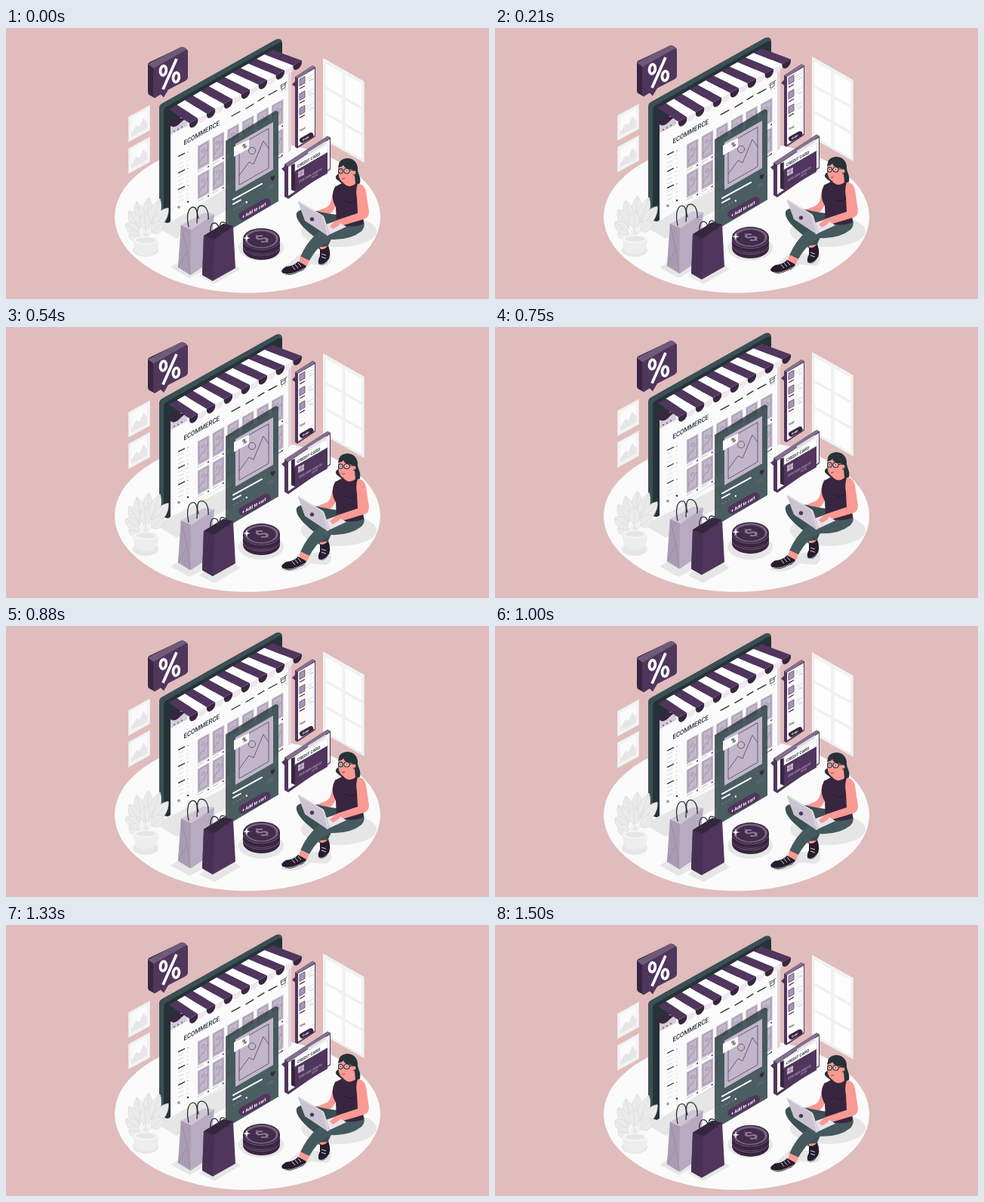
These frames come from a looping animation (640 px wide and 360 px high, 1.54 s). An HTML page:

```html
<!DOCTYPE html>
<html lang="en">
<head>
<meta charset="utf-8">
<style>
html,body{margin:0;width:100%;height:100%;overflow:hidden;background:#e0bcbc}
svg{display:block;width:100vw;height:100vh}
text{font-family:Roboto,sans-serif}
.p{fill:#50355d}.d{fill:#38253f}.l{fill:#c2b7ca}.w{fill:#fafafa}
.skin{fill:#f99a93}.hair{fill:#263238}.shoe{fill:#271b2d}.sh{fill:#e6e6e6}
.line{fill:none;stroke:#263238;stroke-width:1.3;stroke-linecap:round;stroke-linejoin:round}
</style>
</head>
<body>
<svg viewBox="0 0 640 360">
<rect width="640" height="360" fill="#e0bcbc"/>
<ellipse cx="320" cy="251" rx="176" ry="101" class="w"/>
<g class="sh">
  <path d="M198 263L226 280L310 232V205Z"/>
  <path d="M218 318L243 332L270 318L256 330L276 340L311 320L290 305L240 305Z"/>
  <ellipse cx="185" cy="295" rx="17" ry="9"/>
  <ellipse cx="338" cy="292" rx="30" ry="17"/>
  <ellipse cx="441" cy="270" rx="50" ry="21"/>
  <path d="M364 322Q384 331 404 314L424 316Q434 312 430 300L390 300Z"/>
</g>

<g id="float">
  <g id="wall"></g>

  <!-- monitor -->
  <path d="M203 106Q203 102 207 100L358 15Q365 13 366 19V170L215 259L203 257Z" fill="#3a4f54"/>
  <path d="M209 111Q209 107 212 105L361 20Q366 18 366 22V170L214 259L209 257Z" class="hair"/>
  <path d="M218 127L374 40L378 58V162L218 258Z" class="w"/>
  <path d="M374 54L378 56V162L374 165Z" fill="#e4d6dc"/>
  <path d="M218 128L240 116V130L218 142Z" fill="#d5cbda"/>
  <path d="M217 120L238 120L231 126Q224 134 218 130Z" class="d"/>
  <g fill="#75657f"><circle cx="223" cy="137" r="1.1"/><circle cx="228" cy="134.500" r="1.1"/><circle cx="233" cy="131.500" r="1.1"/></g>
  <text transform="matrix(.87 -.5 0 1 235.500 156)" font-size="9" font-weight="500" fill="#263238"><tspan fill="#50355d" font-weight="700">E</tspan>COMMERCE</text>
  <path class="line" d="M299 117l11-6M318 107l10-6M334 97l8-5M348 89l11-6"/>
  <path class="line" style="stroke-width:.8" d="M372 71l-2 2v6l-5 3l-1-6l6-3M365 78l5-3M366 84v.2M370 82v.2"/>
  <g id="shop"></g>
  <g id="awning"></g>

  <!-- percent bubble -->
  <g transform="translate(0 1)">
    <path d="M188 48Q188 45 191 44L231 25Q234 23 238 26L241 29L213 80L209 91L205 87L197 92L190 88Q188 87 188 84Z" class="d"/>
    <path d="M188 47L230 25Q234 23 238 26L240 28L196 53Z" fill="#705a7a"/>
    <path d="M195 55Q195 53 198 51L237 29Q241 27 241 31V65Q241 67 238 69L215 81L209 91L206 86L198 91Q195 92 195 89Z" class="p"/>
    <g fill="none" stroke="#fff" stroke-width="3.700">
      <ellipse cx="208.500" cy="55.500" rx="3.900" ry="6.300" transform="rotate(8 208 55)"/>
      <ellipse cx="225.500" cy="64.500" rx="3.900" ry="6.300" transform="rotate(8 225 64)"/>
      <path d="M208 80.500L226 40"/>
    </g>
  </g>

  <!-- basket panel -->
  <path d="M383 65L406 50L410 52V144L386 160L383 158V78L379 75L383 71Z" class="p"/>
  <path d="M383 65L406 50L410 52L387 67Z" fill="#83708c"/>
  <path d="M387 67L409 54V143L387 157Z" class="w"/>
  <g id="basket"></g>

  <!-- card panel -->
  <path d="M369 181L426 143.500L430 145.500V188L374 227L369 224V191L365 187L369 184Z" class="p"/>
  <path d="M369 181L426 143.500L430 145.500L374 184Z" fill="#83708c"/>
  <path d="M374 184.500L429 147.500V187L374 223Z" class="w"/>
  <path d="M378 182L383 180V217L378 215Z" class="d"/>
  <path d="M383 180L426 155V167L383 192Z" fill="#fff" stroke="#ddd5e0" stroke-width=".6"/>
  <path d="M383 190L426 165V193L383 218Z" class="p"/>
  <path d="M400 165L424 150V154L400 169Z" fill="#e3dde5"/>
  <text transform="matrix(.87 -.5 0 1 386 186)" font-size="5.600" font-weight="700" fill="#263238">CREDIT CARD</text>
  <path d="M387 191L395 187V195L387 199Z" class="l"/>
  <path d="M387 195l8-4M391 189v8" stroke="#735f7d" stroke-width=".6"/>
  <g fill="#d5c9da">
    <text transform="matrix(.87 -.5 0 1 388 206)" font-size="4.100">0000 0000 0000 00</text>
    <text transform="matrix(.87 -.5 0 1 405 200)" font-size="3.500">00/00</text>
  </g>

  <!-- product panel -->
  <path d="M291 150L357 110L361 111V230L295 269L291 267Z" fill="#263238" opacity=".78"/>
  <path d="M295 152L361 113V230L295 269Z" fill="#475c61" opacity=".75"/>
  <path d="M304 154L354 125V188L304 217Z" fill="#c2b7ca"/>
  <g fill="none" stroke="#624d6d" stroke-width=".9">
    <path d="M309 156L348 133.500V186L309 208.500Z"/>
    <circle cx="326" cy="163" r="4.600"/>
    <path d="M309 196L322 178L328 181L341 150L348 160"/>
  </g>
  <path d="M302 158L322 148V160L302 171Z" class="w"/>
  <text transform="matrix(.87 -.5 0 1 313 162)" font-size="9.500" font-weight="700" fill="#263238">%</text>
  <path d="M301 228L339 207M301 234L311 228.500" stroke="#fff" stroke-width="2" stroke-linecap="round"/>
  <g id="rating"></g>
  <path d="M353.500 203q-4-2-2.500-5q2-2 2.500 0q2-4 3-1q0 3-3 6" class="d"/>
  <text transform="matrix(.87 -.5 0 1 347 215)" font-size="5.500" fill="#806c8a">$$$</text>
  <path d="M314 249.500L345 232" stroke="#50355d" stroke-width="11.500" stroke-linecap="round"/>
  <text transform="matrix(.87 -.5 0 1 313 253.500)" font-size="6.300" font-weight="700" fill="#fff">+ Add to cart</text>

  <g id="plant"></g>

  <!-- bags -->
  <path d="M232 262L262 246L276 247L270 311L245 328L228 318Z" fill="#b8abc1"/>
  <path d="M232 262L245 268L244 328L228 318Z" fill="#a99cb2"/>
  <path d="M232 262L240 296L228 318M240 296L244 327" fill="none" stroke="#8e8098" stroke-width=".6"/>
  <path d="M232 262L262 246L276 247L246 268Z" fill="#cfc5d5"/>
  <path class="line" d="M242 264C238 246 243 238 248 238S254 246 253 259M255 253C252 243 254 236 259 236S269 242 268 254"/>
  <path d="M262 276L288 260L301 263L304 319L274 336L260 328Z" class="p"/>
  <path d="M262 276L276 281L274 336L260 328Z" fill="#482f54"/>
  <path d="M262 276L288 260L301 263L276 281Z" fill="#39243f"/>
  <path class="line" d="M272 282C269 266 272 259 276 259S284 264 282 277M284 270C282 262 284 257 288 258S295 262 294 270"/>

  <g id="coins"></g>

  <!-- woman -->
  <path d="M441 182C441 171 463 168 466 185C465 193 471 197 469 206Q463 214 448 209L438 201Q435 197 440 194Z" class="hair"/>
  <path d="M437 209C430 220 434 232 425 238L410 244L411 249L431 246C439 237 441 226 444 217Z" class="skin"/>
  <path d="M438 248C416 245 389 236 385 246C383 256 397 269 416 283L414 294L426 291L432 278L440 263Z" fill="#3c4f54"/>
  <path d="M437 254L472 253Q478 262 471 270Q456 282 431 281Q415 286 402 309L390 304Q398 285 413 272Q425 262 437 260Z" fill="#455a5f"/>
  <path d="M436 211L447 205L461 206L473 211Q478 227 472 240L474 260Q458 267 438 260L437 238Q429 224 436 211Z" class="d"/>
  <path d="M448 229q9 6 16 0M470 218q1 11-2 18" fill="none" stroke="#251629" stroke-width=".8"/>
  <path d="M450 196L462 196L463 207Q455 214 447 206Z" class="skin"/>
  <path d="M442 181Q450 176 460 183L462 196Q456 208 446 205Q439 200 441 188Z" class="skin"/>
  <path d="M440 185Q442 175 452 174Q463 174 464 188L461 197Q459 193 459 188Q449 188 447 182Q445 185 440 185Z" class="hair"/>
  <circle cx="461" cy="192" r="2.500" class="skin"/>
  <g fill="#fff" fill-opacity=".3" stroke="#263238" stroke-width="1.100"><ellipse cx="443.500" cy="190" rx="2.900" ry="3.100"/><ellipse cx="451.500" cy="190" rx="3.600" ry="3.300"/><path d="M455 189.500l5-1" fill="none"/></g>
  <g class="hair"><circle cx="443.500" cy="190" r=".8"/><circle cx="451.500" cy="190" r=".8"/></g>
  <path d="M445 200q2 1 4-.5" fill="none" stroke="#b4464b" stroke-width="1.100"/>
  <path d="M466 207Q474 206 477 217L481 244Q481 252 474 254L447 262L434 266L429 262L439 255L466 246L465 226Q463 215 466 207Z" class="skin"/>
  <path d="M425 276L451 264L438 256L418 263Z" fill="#e8e3eb"/>
  <path d="M388 230Q386 231 388 234L396 256L426 276L429 274L422 252Q421 249 418 248Z" fill="#cbc4d0"/>
  <path d="M388 231L420 250L427 275" fill="none" stroke="#eee9f0" stroke-width="1"/>
  <circle cx="405.500" cy="254" r="2.700" class="p"/>
  <path d="M429 263l8-7l8 1l-5 6l-7 4Z" class="skin"/>
  <path d="M390 303L402 309L399 316L388 313Z" class="skin"/>
  <path d="M416 291L426 290L427 297L416 297Z" class="skin"/>
  <path d="M387 310L398 316Q397 321 388 324Q375 331 367 326Q362 322 371 317Q382 316 387 310Z" class="shoe"/>
  <path d="M416 293Q421 296 427 289Q432 302 426 310Q420 317 415 314Q412 310 416 303Z" class="shoe"/>
  <path d="M367 326Q377 330 396 319M415 314Q421 316 428 307" fill="none" stroke="#fff" stroke-width=".7"/>
  <path d="M379 316l4 5M383 314l4 5M387 312l4 5M418 300l6 2M418 304l6 2" stroke="#fff" stroke-width=".8"/>
</g>
</svg>
<script>
const $ = id => document.getElementById(id);
const fill = (id, html) => { $(id).innerHTML = html; };
const times = (n, f) => Array.from({length: n}, (_, i) => f(i)).join('');
// Upright sheet seen from the side: horizontal edges follow the given slope
const sheet = (x, y, slope, body) => `<g transform="matrix(1 ${slope} 0 1 ${x} ${y})">${body}</g>`;
const rect = (x, y, w, h, color, extra = '') =>
  `<rect x="${x}" y="${y}" width="${w}" height="${h}" fill="${color}" ${extra}/>`;
const ellipse = (x, y, rx, ry, color, extra = '') =>
  `<ellipse cx="${x}" cy="${y}" rx="${rx}" ry="${ry}" fill="${color}" ${extra}/>`;

const frame = y => sheet(162, y, -.55,
  rect(0, 0, 29, 34, '#e8e8e8') + rect(1, 1, 27, 32, '#f3f3f3') + rect(4, 4, 21, 25, '#fafafa') +
  '<path d="M4 29V24L11 17L15 21L20 12L25 21V29Z" fill="#e6e6e6"/>');
fill('wall', frame(118) + frame(160) + sheet(420, 40, .567,
  rect(0, 0, 55, 108, '#e8e8e8') + rect(0, 0, 53.500, 107, '#f3f3f3') +
  times(6, i => rect(3 + i % 2 * 26, 4 + (i >> 1) * 34.500, 23, 32, '#fdfdfd', 'stroke="#e6e6e6" stroke-width=".6"'))));

const product = i => {
  const row = i / 6 | 0, col = i % 6;
  return sheet(254 + col * 19.600, 157 + row * 39 - col * 10.800, -.56,
    rect(0, 0, 15.500, 32, '#c2b7ca') +
    `<g fill="none" stroke="#9585a0" stroke-width=".6">${rect(2, 2, 11.500, 27, 'none')}
     <circle cx="7" cy="10" r="2"/><path d="M2 24L6 18L8 20L12 11L13.500 13"/></g>` +
    rect(0, 34, 8, 1, '#c4bcc8') + '<circle cx="14" cy="35" r="1" fill="#38253f"/>');
};
const menuRow = i => sheet(228, 170 + i * 5.500, -.5, i % 4
  ? rect(0, 0, 7, .8, '#d5d0d7') + rect(11, 1, 3, .8, '#ddd')
  : rect(0, 0, 9, 1.400, '#263238') + rect(12, 1, 2, 1, '#9b8fa2'));
fill('shop', times(12, product) + times(12, menuRow) +
  ellipse(229, 238, 1.300, 1.300, 'none', 'stroke="#263238" stroke-width=".7"') +
  ellipse(241, 231, 1.300, 1.300, '#50355d'));

const ridge = i => [216 + 10.550 * i, 108 - 6.080 * i];
const hem = i => [243 + 11.460 * i, 126.500 - 6.400 * i];
fill('awning', times(13, i =>
  `<path d="M${hem(i)}v2.500c1 8 11 1 11.460-6.400v-2.500Z" fill="${i % 2 ? '#ece8ee' : '#38253f'}"/>
   <path d="M${ridge(i)}L${ridge(i + 1)}L${hem(i + 1)}L${hem(i)}Z" fill="${i % 2 ? '#fff' : '#50355d'}"/>`));

fill('basket', times(3, i => sheet(389, 68 + i * 19.300, -.55,
  rect(0, 0, 7, 9, '#a596af', 'stroke="#50355d" stroke-width=".6"') +
  rect(10, 3, 8, .7, '#d0cbd3') + rect(10, 6, 6, .7, '#d0cbd3') + rect(13, 9, 5, .8, '#b9afbf') +
  rect(0, 12, 7, 1.300, '#38253f'))) +
  `<text transform="matrix(.87 -.5 0 1 389 138)" font-size="3.800" font-weight="700" fill="#263238">Total</text>
   <path d="M392.500 149L404 142.500" stroke="#38253f" stroke-width="7" stroke-linecap="round"/>
   <text transform="matrix(.87 -.5 0 1 393 150.500)" font-size="4" font-weight="700" fill="#fff">Order</text>`);

fill('rating', times(5, i => ellipse(302 + i * 4.200, 241 - i * 2.400, 1.200, 1.300, i == 4 ? '#fff' : '#7b6b83')));

// Leaf tips
const leaves = [[189,225],[173,231],[163,243],[204,227],[215,239],[159,260],[163,274],[208,258],[184,246]];
const leaf = ([x, y]) => {
  const length = Math.hypot(x - 185, y - 279), angle = Math.atan2(y - 279, x - 185) * 180 / Math.PI;
  const start = length * .36, mid = length * .7;
  return `<g transform="translate(185 279) rotate(${angle})" stroke="#dadada" stroke-width=".7">
    <path d="M${start} 0C${start + 2} -10 ${mid + 6} -9 ${length} 0C${mid + 6} 9 ${start + 2} 10 ${start} 0" fill="#ebebeb"/>
    <path d="M0 0H${length}"/></g>`;
};
fill('plant', leaves.map(leaf).join('') +
  '<path d="M169 282L202 282Q202 296 196 300Q185 306 174 300Q169 296 169 282Z" fill="#ededed"/>' +
  ellipse(185.500, 282, 16.500, 5.500, '#f5f5f5') + ellipse(185.500, 282, 13, 3.800, '#e6e6e6'));

const coin = y =>
  `<path d="M314 ${y}v6a24.500 14 0 0 0 49 0v-6Z" fill="#38253f"/>` +
  `<path d="M314.500 ${y + 3}a24.500 14 0 0 0 48 0" fill="none" stroke="#705b7b" stroke-width="1.300"/>` +
  ellipse(338.500, y, 24.500, 14, '#38253f') + ellipse(338.500, y, 22.500, 12.600, '#75627d') +
  ellipse(338.500, y + .5, 19, 10.500, '#422b4d');
fill('coins', coin(288) + coin(280) +
  '<text transform="matrix(.85 -.5 .85 .5 339 280)" y="7.500" text-anchor="middle" font-size="21" font-weight="700" fill="#8d7b96">$</text>' +
  '<path d="M319 274l1 4l4 1l-4 1l-1 4l-1-4l-4-1l4-1Z" fill="#fff"/>');

const period = 1540, lift = 7;
function draw() {
  const phase = performance.now() % period / period;
  const y = -lift * (1 - Math.abs(2 * phase - 1));
  $('float').setAttribute('transform', `translate(0 ${y})`);
  requestAnimationFrame(draw);
}
draw();
</script>
</body>
</html>
```
